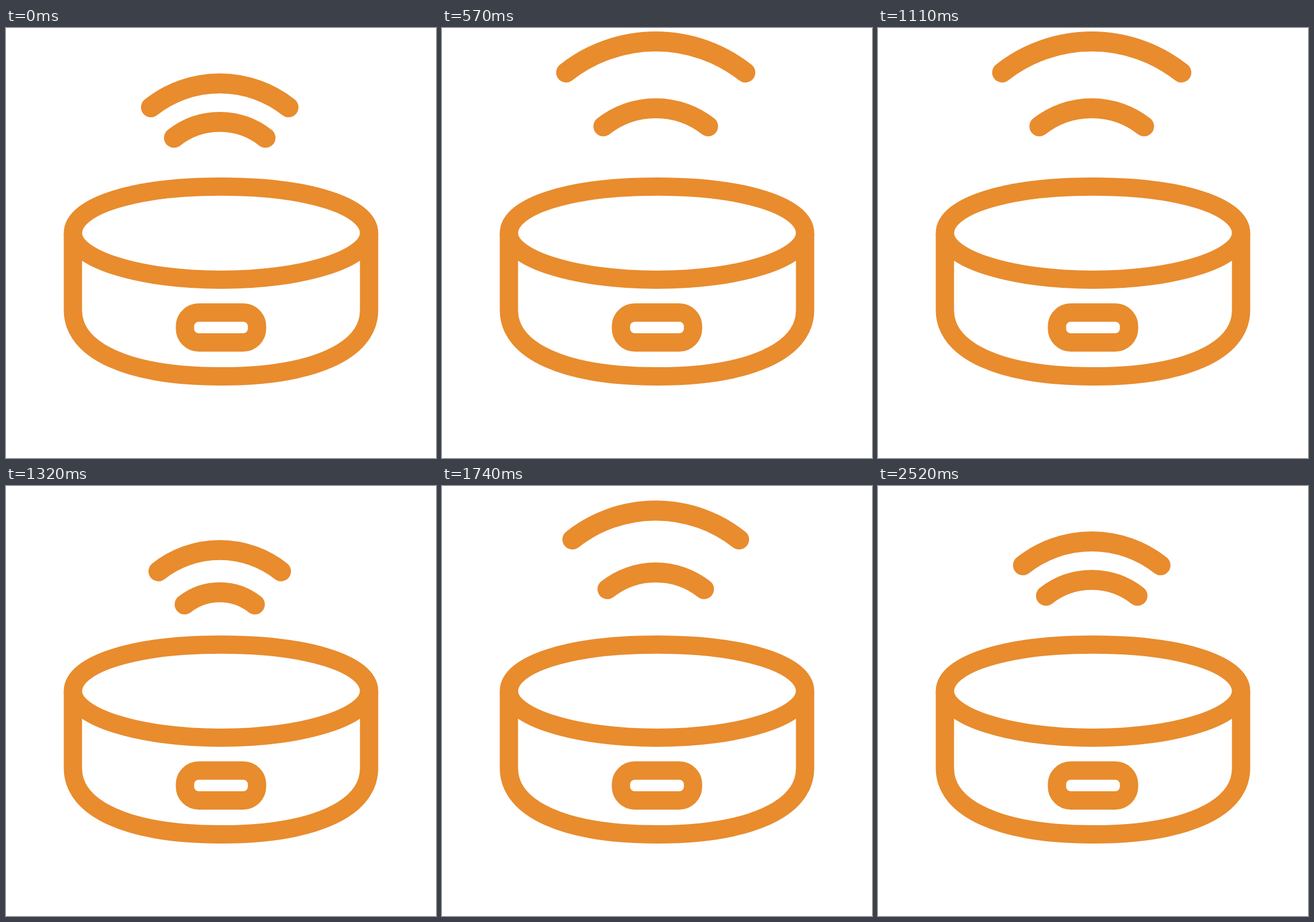
Animation, 748 px wide and 748 px high, one loop 2.55 s. Source, as an HTML page:

```html
<!DOCTYPE html>
<html lang="en">
<head>
<meta charset="utf-8">
<title>Smart speaker</title>
<style>
  html, body { margin: 0; width: 100%; height: 100%; overflow: hidden; background: #fff; }
  svg { display: block; width: 100%; height: 100%; }
</style>
</head>
<body>
<svg viewBox="0 0 748 748" fill="none" stroke="#e88c2e" stroke-width="31.8">
  <path id="side"/>
  <path id="lid"/>
  <rect id="button" height="52" rx="24"/>
  <g stroke-width="34.8" stroke-linecap="round">
    <path id="outer"/>
    <path id="inner"/>
  </g>
</svg>
<script>
const STEP = 30, LOOP = 2550;
const START = 10, BEAT = 18, BEATS = 3, SETTLE = START + BEAT * BEATS;
const CX = 374, WAVE_X = 371.8;
const el = id => document.getElementById(id);

// Poses are [scale, vertical shift]; swellAt and restAt count steps from SETTLE.
const waves = [
  {
    node: el('outer'), half: 119.6, rise: 41.5, mid: 117.2,
    ready: [1.03, -14.5], peak: [1.325, -71], dip: [0.891, 12.7], swell: [1.157, -21],
    swellAt: 6, restAt: 18
  },
  {
    node: el('inner'), half: 79.6, rise: 27.5, mid: 177.2,
    ready: [1.006, -8], peak: [1.155, -23], dip: [0.767, 18.3], swell: [1.157, -9.7],
    swellAt: 3, restAt: 20
  }
];

function ease(u) {
  const c = Math.min(1, Math.max(0, u));
  return c * c * (3 - 2 * c);
}

function poseAt(w, step) {
  let pose = [1, 0];
  const move = (to, from, until) => {
    const k = ease((step - from) / (until - from));
    pose = pose.map((v, i) => v + (to[i] - v) * k);
  };
  for (let b = START; b < SETTLE; b += BEAT) {
    move(w.ready, Math.max(START, b - 2), b + 3);
    move(w.peak, b + 4, b + 10);
    move(w.dip, b + 10, b + 16);
  }
  move(w.swell, SETTLE - 2, SETTLE + w.swellAt);
  move([1, 0], SETTLE + w.swellAt, SETTLE + w.restAt);
  return pose;
}

function setAll(node, attrs) {
  for (const name in attrs) node.setAttribute(name, attrs[name]);
}

// Half an oval from left to right; k above 0.552 makes it squarer.
function halfOval(rx, ry, y, k) {
  const end = y + ry, cy = y + ry * k;
  return `C${CX - rx} ${cy} ${CX - rx * k} ${end} ${CX} ${end}`
    + `S${CX + rx} ${cy} ${CX + rx} ${y}`;
}

function drawBody(step) {
  const phase = (step - START) % BEAT;
  const active = step > START && step < SETTLE && phase < 6;
  const q = active ? (1 - Math.cos(Math.PI * phase / 3)) / 2 : 0;
  const rx = 257.6 + 7.8 * q, y = 356.9 + 15 * q, left = CX - rx;
  const width = 125.4 + 15 * q;
  setAll(el('side'), { d: `M${left} ${y}V491${halfOval(rx, 115, 491, 0.62)}V${y}` });
  setAll(el('lid'), {
    d: `M${left} ${y}${halfOval(rx, -81, y, 0.585)}M${left} ${y}${halfOval(rx, 81, y, 0.552)}`
  });
  setAll(el('button'), { x: CX - width / 2, y: 495 + 8 * q, width });
}

function drawWave(w, step) {
  const [scale, shift] = poseAt(w, step);
  const half = w.half * scale, rise = w.rise * scale;
  const y = w.mid + shift + rise / 2;
  const r = (half * half + rise * rise) / (2 * rise);
  setAll(w.node, { d: `M${WAVE_X - half} ${y}A${r} ${r} 0 0 1 ${WAVE_X + half} ${y}` });
}

function render(ms) {
  const step = Math.floor((ms % LOOP) / STEP);
  drawBody(step);
  for (const w of waves) drawWave(w, step);
}

let begin = null;
function tick(now) {
  if (begin === null) begin = now;
  render(Math.max(0, now - begin));
  requestAnimationFrame(tick);
}
render(0);
requestAnimationFrame(tick);
</script>
</body>
</html>
```
